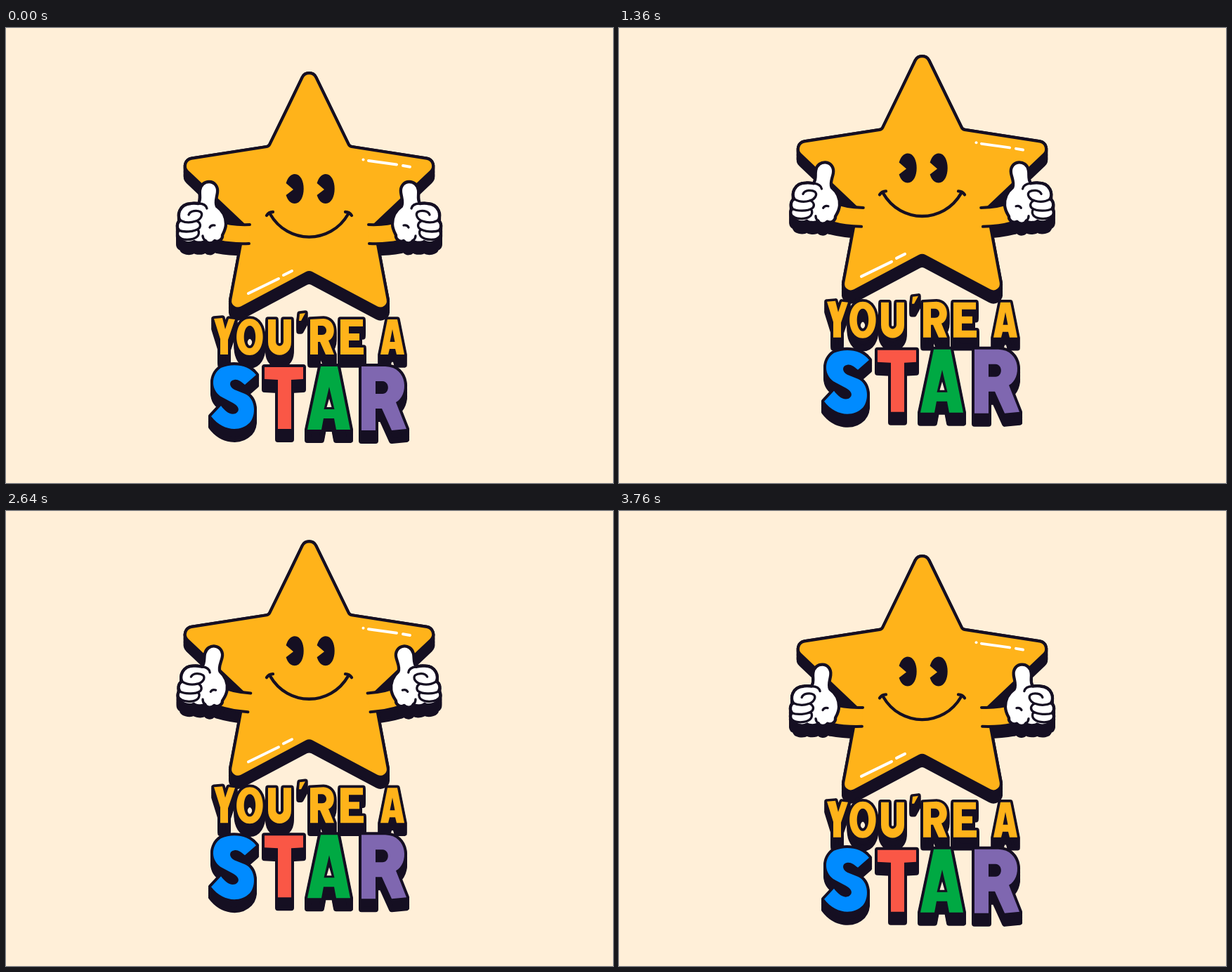
An HTML page with a canvas that plays this animation: 864 px wide and 648 px high, repeating every 3840 ms.

```html
<!DOCTYPE html>
<html lang="en">
<head>
<meta charset="utf-8">
<title>You're a star</title>
<style>
  html, body { margin: 0; width: 100%; height: 100%; overflow: hidden; background: #ffefd8; }
  canvas { display: block; width: 864px; height: 648px; }
</style>
</head>
<body>
<canvas width="864" height="648" role="img" aria-label="You're a star"></canvas>
<script>
const ctx = document.querySelector('canvas').getContext('2d');
const LOOP = 3840, STEP = 80, DEPTH = 15, MID = 431.5;
const INK = '#150f22', GOLD = '#ffb31a', CREAM = '#ffefd8';
const TAU = Math.PI * 2;

const path = d => new Path2D(d);

// Left half of the star as [x, y, corner radius]; the right half is mirrored.
function makeStar() {
  const left = [[374, 168.5, 6], [242, 189, 11], [339, 281, 3], [315, 409, 11]];
  const right = left.map(([x, y, r]) => [2 * MID - x, y, r]).reverse();
  const pts = [[MID, 50, 11], ...left, [MID, 347, 8], ...right];
  const p = new Path2D();
  p.moveTo(403, 109);
  pts.slice(1).concat([pts[0]]).forEach(([x, y, r], i, all) => {
    const next = all[(i + 1) % all.length];
    p.arcTo(x, y, next[0], next[1], r);
  });
  p.closePath();
  return p;
}
const star = makeStar();

const hand = path(`M274 250 C278 243 275 238 276 231 C277 223 283 219 289 219
  C297 219 302 226 301 234 C300 242 297 248 300 254 C307 259 313 268 313 279
  C313 286 310 291 308 295 C309 300 303 306 297 303 C293 308 286 307 284 303
  C280 307 270 306 268 304 C262 308 250 306 249 300 C243 298 243 291 246 288
  C242 283 244 276 248 274 C243 268 246 251 263 250 C268 249 272 250 274 250Z`);
const knuckles = path(`M260 266 C262 260 272 259 277 262 C281 266 277 273 270 275 C262 278 254 277 248 274
  M246 288 C252 291 268 291 275 285 C278 281 276 277 272 275
  M249 300 C258 303 269 301 273 296 C275 293 275 290 273 287
  M274 250 C281 250 285 253 286 257 M290 284 Q292 280 297 281 M284 303 Q280 300 280 296`);
const arm = path('M347 280 Q320 281 300 275 L300 304 Q322 308 346 307Z');
const armEdges = path('M347 280 Q320 281 304 275 M346 307 Q322 308 304 304');

const youre = [
  'M296 414 L308 413 L312 429 L317 414 L326 415 L316 444 L316 465 L305 465 L305 443Z',
  'M347 414 C372 414 372 466 347 466 C322 466 322 414 347 414Z M347 424 C336 424 336 456 347 456 C358 456 358 424 347 424Z',
  'M373 415 L384 415 L384 446 C384 455 395 455 395 446 L395 415 L406 415 L406 447 C406 472 373 472 373 447Z',
  'M418 407 L426 406 L420 417 L417 417Z',
  'M433 415 L452 414 C471 415 470 442 459 445 L467 465 L455 465 L447 447 L444 447 L444 465 L433 465Z M444 424 L450 424 C458 425 458 437 450 437 L444 437Z',
  'M476 415 L508 415 L508 425 L488 425 L488 435 L503 435 L503 445 L488 445 L488 455 L509 455 L509 465 L476 465Z',
  'M543 415 L557 415 L567 465 L556 465 L554 457 L546 457 L544 465 L533 465Z M550 429 L553.5 447 L546.5 447Z'
].map(path);

const bigLetters = [
  ['#008bff', `M356 494 L340 508 C334 503 330 500 325 501 C317 502 317 511 325 515 L340 521
    C356 528 356 552 347 562 C333 576 308 574 292 553 L306 538 C312 546 319 552 327 549
    C334 545 331 538 323 534 L308 526 C291 517 291 494 306 484 C322 477 345 479 356 494Z`],
  ['#fa5746', 'M368 483 L423 483 L423 500 L406 501 L406 571 L387 571 L387 501 L368 500Z'],
  ['#00a943', 'M448 482 L472 482 L490 572 L470 572 L467 556 L452 556 L449 572 L429 572Z M460 511 L467.5 543 L452.5 543Z',
    'M460 528 L463.5 540 L456.5 540Z'],
  ['#7f67b0', `M506 482 L540 482 C573 483 573 524 555 533 L570 571 L549 573 L535 542 L526 542 L526 573 L506 573Z
    M526 503 L536 503 C547 504 546 521 536 521 L526 521Z`]
].map(([color, d, gap = '']) => ({ color, shape: path(d), gap: path(gap) }));

const EYE_Y = 229;
const eye = path('M398.6 221 C401 213 405.5 208 411 208 C428 208 428 250 411 250 C405.5 250 401 246 398.6 238 L409 230Z');
const shutEye = path('M404 226 L424 226 L424 233 L404 233 L409 229.5Z');
const smile = path('M376 265 C401 308.5 462 308.5 487 265 M371 267 Q374 262 380 262 M492 267 Q489 262 483 262');
const shine = path('M516 189 L556 194.5 M565 196 L575 197.7 M345 378 L388 357 M395 352 L407 346');

function paint(shape, fill, width, color = INK) {
  if (fill) {
    ctx.fillStyle = fill;
    ctx.fill(shape, 'evenodd');
  }
  if (width) {
    ctx.strokeStyle = color;
    ctx.lineWidth = width;
    ctx.stroke(shape);
  }
}

function shifted(dx, dy, draw) {
  ctx.save();
  ctx.translate(dx, dy);
  draw();
  ctx.restore();
}

function extrude(draw) {
  for (let dy = 0; dy <= DEPTH; dy += 2.5) shifted(0, dy, draw);
}

function bothArms(angle, draw) {
  for (const side of [1, -1]) {
    ctx.save();
    ctx.translate(MID, 0);
    ctx.scale(side, 1);
    ctx.translate(346 - MID, 293);
    ctx.rotate(angle);
    ctx.translate(-346, -293);
    draw();
    ctx.restore();
  }
}

function drawFace(t) {
  const open = Math.min(1, 0.17 + Math.abs(t - 2320) / 190);
  for (const dx of [0, 44]) shifted(dx, 0, () => {
    if (open < 0.2) return paint(shutEye, INK, 0);
    ctx.translate(0, EYE_Y * (1 - open));
    ctx.scale(1, open);
    paint(eye, INK, 0);
  });
  paint(smile, null, 4.3);
}

function drawSparkle(t) {
  const u = (t - 2640) / 640;
  const size = u > 0 && u < 1 ? 7.5 * Math.sin(Math.PI * u) ** 2 : 0;
  shifted(508.5, 187.5, () => {
    ctx.fillStyle = '#fff';
    ctx.beginPath();
    ctx.arc(0, 0, 2, 0, TAU);
    ctx.fill();
    ctx.rotate(0.18);
    ctx.beginPath();
    ctx.moveTo(size, 0);
    for (let k = 1; k <= 4; k++) {
      const a = k * TAU / 4;
      ctx.quadraticCurveTo(0, 0, size * Math.cos(a), size * Math.sin(a));
    }
    ctx.fill();
  });
}

function drawCharacter(t, sway) {
  const angle = 0.065 * sway;
  extrude(() => {
    paint(star, INK, 4.2);
    bothArms(angle, () => {
      paint(arm, INK, 4);
      paint(hand, INK, 4);
    });
  });
  paint(star, GOLD, 4.2);
  paint(shine, null, 4, '#fff');
  drawSparkle(t);
  shifted(0, -5.5 * sway, () => drawFace(t));
  bothArms(angle, () => {
    paint(arm, GOLD, 0);
    paint(armEdges, null, 4);
    paint(hand, '#fff', 4.3);
    paint(knuckles, null, 3.3);
  });
}

// Each big letter dips in turn, one after the other.
function dip(t, index) {
  const u = (t % 1280 - index * 160) / 640;
  return u > 0 && u < 1 ? 20 * Math.sin(Math.PI * u) ** 2 : 0;
}

function render(t) {
  const phase = TAU * t / LOOP, lag = Math.PI / 6;
  const lift = -15 * (1 - Math.cos(phase));
  // The face and arms follow the body a little late.
  const sway = Math.cos(lag) - Math.cos(phase - lag);

  ctx.fillStyle = CREAM;
  ctx.fillRect(0, 0, 864, 648);
  ctx.lineJoin = ctx.lineCap = 'round';

  shifted(0, lift, () => {
    drawCharacter(t, sway);
    extrude(() => youre.forEach(shape => paint(shape, INK, 7.5)));
    youre.forEach(shape => paint(shape, GOLD, 0));

    const atDip = draw => bigLetters.forEach((item, i) => shifted(0, dip(t, i), () => draw(item)));
    atDip(({ shape }) => extrude(() => paint(shape, INK, 8)));
    atDip(({ shape, color, gap }) => {
      paint(shape, color, 0);
      paint(gap, CREAM, 0);
    });
  });
}

function frame() {
  const t = performance.now() % LOOP;
  render(Math.floor(t / STEP) * STEP);
  requestAnimationFrame(frame);
}
frame();
</script>
</body>
</html>
```
